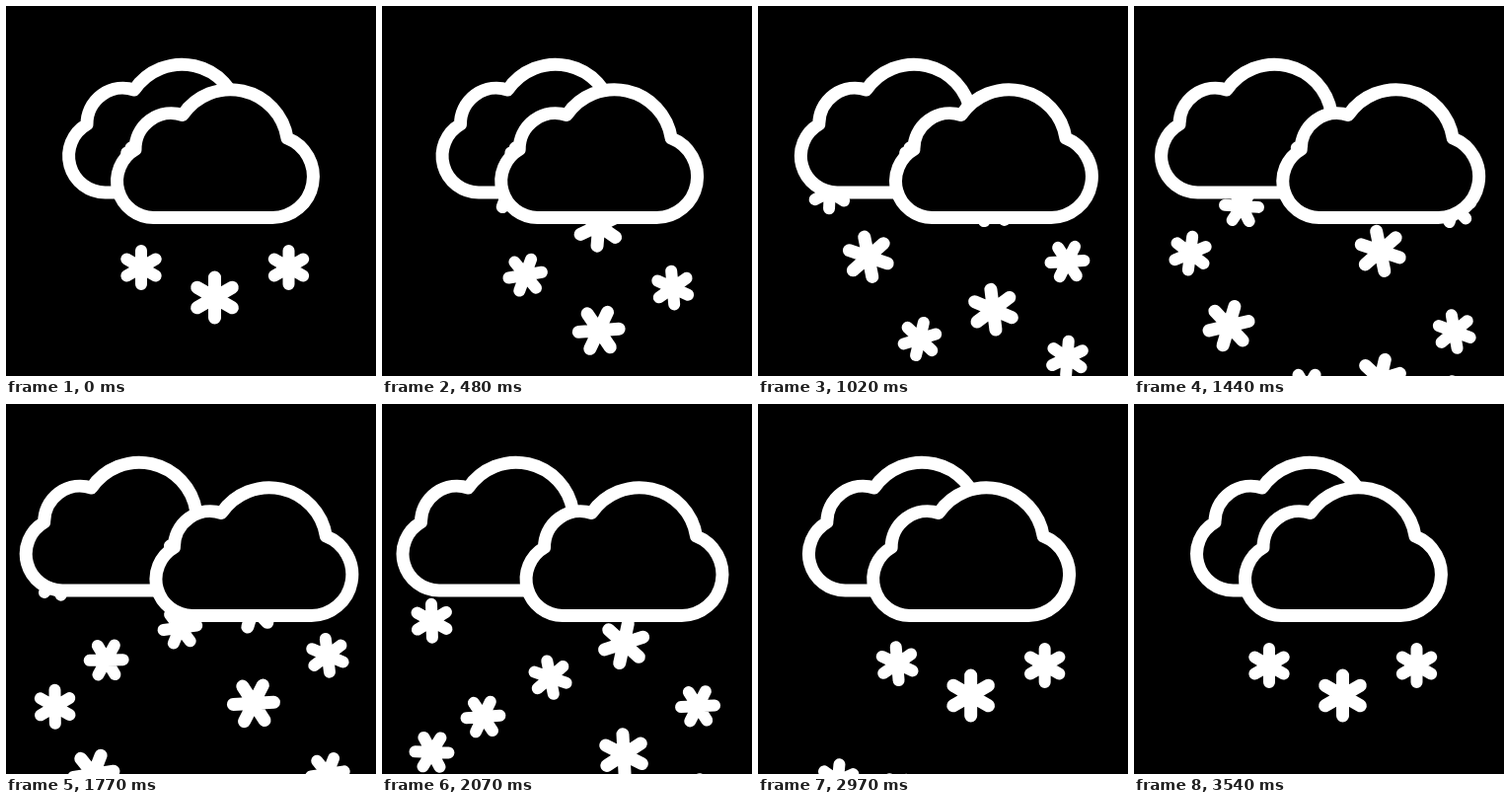
Write an HTML page that moves like this. It is 375 px wide and 375 px high and loops after 3.93 s.

```html
<!DOCTYPE html>
<html lang="en">
<head>
<meta charset="utf-8">
<title>Snow clouds</title>
<style>
  html, body { margin: 0; width: 100%; height: 100%; overflow: hidden; background: #000; }
  svg { display: block; width: 100vw; height: 100vh; }
  path { stroke: #fff; stroke-linecap: round; stroke-linejoin: round; }
</style>
</head>
<body>
<svg viewBox="0 0 375 375">
  <defs>
    <path id="cloud" fill="#000" stroke-width="13"
      d="M150 214.5A37 37 0 0 1 131 145.5A36.5 36.5 0 0 1 179 110.5A58.3 58.3 0 0 1 285 134A41.7 41.7 0 0 1 270 214.5Z"/>
    <path id="small" stroke-width="12" d="M0-17V17M-14.7-8.5L14.7 8.5M-14.7 8.5L14.7-8.5"/>
    <path id="big" stroke-width="13" d="M0-20.5V20.5M-17.8-10.25L17.8 10.25M-17.8 10.25L17.8-10.25"/>
  </defs>
  <g id="back"><g class="snow"></g><use href="#cloud" x="-49" y="-25.5"/></g>
  <g id="front"><g class="snow"></g><use href="#cloud"/></g>
</svg>
<script>
const LOOP = 3930, STEP = 30, LAST = 3540, DRIFT = 1650;

// x, top, fall, start, duration, turn, stays at the end
const smallFlakes = {
  back: [
    [93, 157, 240, 545, 2100, 480],
    [93, 157, 270, 1413, 2100, 510],
    [145, 157, 270, 890, 2100, 550]
  ],
  front: [
    [137, 265, 135, 275, 1420, 360],
    [137, 157, 242, 1025, 2100, 703],
    [137, 157, 108, 1780, 1290, 278, true],
    [286.5, 265, 135, 125, 1440, 360],
    [286.5, 157, 242, 80, 2100, 490],
    [286.5, 157, 242, 855, 2100, 725],
    [286.5, 157, 108, 1645, 1290, 360, true]
  ]
};
const bigFlakes = {
  back: [[132, 168, 262, 125, 2330, 330]],
  front: [
    [211.5, 295.5, 140, 36, 1400, 360],
    [211.5, 190, 246, 0, 2100, 487],
    [211.5, 190, 246, 775, 2100, 710],
    [211.5, 182, 113.5, 1370, 1340, 360, true]
  ]
};

const clamp = v => Math.min(1, Math.max(0, v));
const ease = p => p * p * (3 - 2 * p);
const sway = (t, start) => ease(clamp(1 - Math.abs(t - start - DRIFT) / DRIFT));

const flakes = [];
function addFlakes(shape, groups) {
  for (const [layer, rows] of Object.entries(groups)) {
    for (const row of rows) {
      const el = document.createElementNS('http://www.w3.org/2000/svg', 'use');
      el.setAttribute('href', '#' + shape);
      document.querySelector(`#${layer} .snow`).append(el);
      flakes.push({ el, row });
    }
  }
}
addFlakes('small', smallFlakes);
addFlakes('big', bigFlakes);

const back = document.getElementById('back');
const front = document.getElementById('front');

function draw(t) {
  back.setAttribute('transform', `translate(${-44 * sway(t, 240)})`);
  front.setAttribute('transform', `translate(${40 * sway(t, 0)})`);
  for (const { el, row } of flakes) {
    const [x, top, fall, start, duration, turn, stays] = row;
    const p = clamp((t - start) / duration), s = ease(p);
    const angle = turn * (stays ? s - 1 : s);
    el.setAttribute('transform', `translate(${x} ${top + fall * s}) rotate(${angle})`);
    el.setAttribute('visibility', p === 1 && !stays ? 'hidden' : 'visible');
  }
}

const begin = performance.now();
function tick() {
  const t = (performance.now() - begin) % LOOP;
  draw(Math.min(LAST, Math.floor(t / STEP) * STEP));
  requestAnimationFrame(tick);
}
tick();
</script>
</body>
</html>
```
